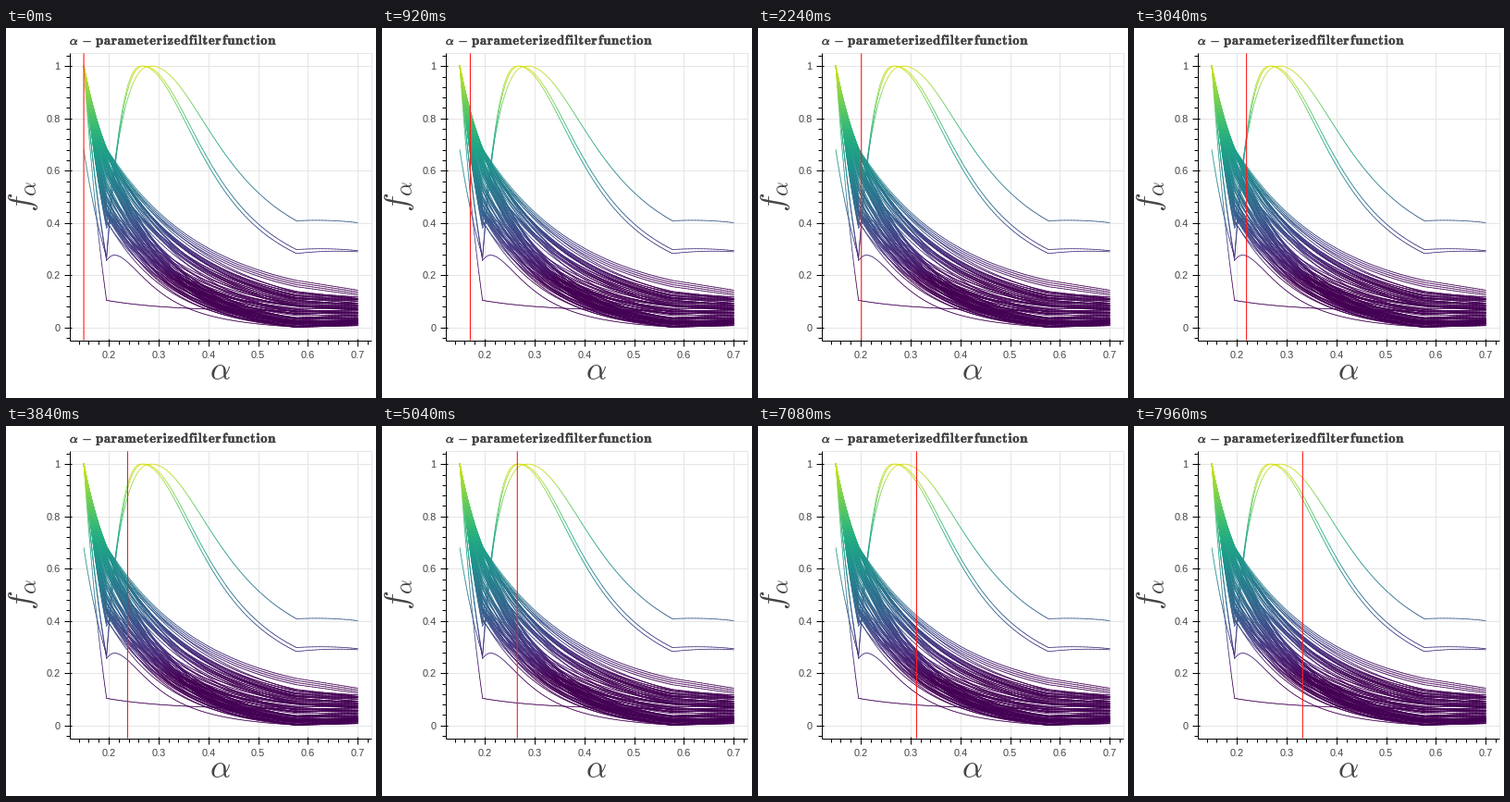
These frames come from a looping animation (400 px wide and 400 px high, 8 s). A matplotlib script:

```python
import numpy as np
import matplotlib.pyplot as plt
from matplotlib.animation import FuncAnimation
from matplotlib.collections import LineCollection
from matplotlib.patheffects import withStroke

SIZE, DPI = 400, 100
PX = 72 / DPI
FRAMES, INTERVAL = 200, 40
LEFT, RIGHT, TOP, BOTTOM = 69.4, 395.4, 27.4, 337.6
X_SCALE, Y_SCALE, Y_ZERO = 538.6, 282.6, 323.8
A_START, A_KINK, A_BEND, A_END = 0.15, 0.1957, 0.577, 0.7
A_STEP = 0.55 / 600
GREY, GRID = "#444444", "#e5e5e5"

plt.rcParams["mathtext.fontset"] = "cm"
fig = plt.figure(figsize=(SIZE / DPI, SIZE / DPI), dpi=DPI, facecolor="white")


def stage():
    """Full-figure axes in pixel units, y pointing down."""
    ax = fig.add_axes([0, 0, 1, 1])
    ax.set_xlim(0, SIZE)
    ax.set_ylim(SIZE, 0)
    ax.axis("off")
    return ax


def to_x(a):
    return 84.1 + (a - A_START) * X_SCALE


def to_y(v):
    return Y_ZERO - Y_SCALE * v


def decay(t, k):
    """Exponential fall from 1 at t=0 to 0 at t=1."""
    return (np.exp(-k * t) - np.exp(-k)) / (1 - np.exp(-k))


def bell_side(t, q):
    """Falling side of a bell, from 1 at t=0 to 0 at t=1."""
    return (1 / (1 + q * t * t) - 1 / (1 + q)) * (1 + q) / q


def span(a, b, n):
    return np.linspace(a, b, n), np.linspace(0, 1, n)


head_a, head_t = span(A_START, A_KINK, 26)
mid_a, mid_t = span(A_KINK, A_BEND, 160)
tail_a, tail_t = span(A_BEND, A_END, 20)
alphas = np.concatenate([head_a, mid_a[1:], tail_a[1:]])


def joined(mid, end, bow=0.0, start=1.0):
    """Add the steep head and the flat tail to a middle part."""
    head = mid[0] + (start - mid[0]) * decay(head_t, 0.7)
    tail = mid[-1] + (end - mid[-1]) * tail_t + bow * tail_t * (1 - tail_t)
    return np.concatenate([head, mid[1:], tail[1:]])


def falling(v1, v2, end, k, hump=0.0):
    mid = v2 + (v1 - v2) * decay(mid_t, k)
    return joined(mid + hump * mid_t * np.exp(-10 * mid_t), end)


def peaked(v1, peak, v2, q, end, start=1.0):
    rise = np.clip((mid_a - A_KINK) / (peak - A_KINK), 0, 1)
    fall = np.clip((mid_a - peak) / (A_BEND - peak), 0, 1)
    up = v1 + (1 - v1) * (1 - (1 - rise) ** 2.5)
    down = v2 + (1 - v2) * bell_side(fall, q)
    return joined(np.where(mid_a < peak, up, down), end, 0.02, start)


def curves():
    rng = np.random.default_rng(12)
    out = []
    for _ in range(88):
        r, s, e, w = rng.random(4)
        v1 = 0.685 - 0.29 * r ** 1.6
        v2 = 0.001 + 0.15 * s ** 1.4 * (1 - 0.5 * r)
        out.append(falling(v1, v2, 0.75 * v2 + 0.004 + 0.02 * e,
                           3 - 7 * v2 + 0.6 * (w - 0.5)))
    for i in range(4):
        v2 = 0.18 - 0.008 * i
        out.append(falling(0.685 - 0.008 * i, v2, 0.795 * v2, 1.95))
    out.append(falling(0.256, 0.002, 0.01, 3, 1.9))
    out.append(falling(0.39, 0.025, 0.02, 2.8, 2.5))
    out.append(falling(0.38, 0.018, 0.02, 2.8, 2.5))
    out.append(falling(0.104, 0.064, 0.056, 3))
    out.append(peaked(0.27, 0.267, 0.283, 4, 0.29, start=0.68))
    out.append(peaked(0.265, 0.271, 0.298, 3.8, 0.294))
    out.append(peaked(0.39, 0.286, 0.408, 2.8, 0.401))
    return out


def label(ax, x, y, s, px, **kw):
    return ax.text(x, y, s, fontsize=px * PX, color=GREY, **kw)


def line(ax, x, y, color="black", width=1, **kw):
    return ax.plot(x, y, color=color, lw=width * PX,
                   solid_capstyle="butt", **kw)[0]


def draw_axes(ax):
    xticks = np.arange(2, 8) / 10
    yticks = np.arange(0, 6) / 5
    for a in xticks:
        line(ax, [to_x(a)] * 2, [TOP, BOTTOM], GRID)
    for v in yticks:
        line(ax, [LEFT, RIGHT], [to_y(v)] * 2, GRID)
    line(ax, [LEFT, RIGHT, RIGHT], [TOP, TOP, BOTTOM], GRID)
    line(ax, [LEFT, LEFT], [TOP, BOTTOM])
    line(ax, [LEFT, RIGHT], [BOTTOM, BOTTOM])

    for i in range(7, 37):
        line(ax, [to_x(i / 50)] * 2, [BOTTOM, BOTTOM + 4])
    for i in range(-1, 27):
        line(ax, [LEFT - 4, LEFT], [to_y(i / 25)] * 2)
    font = dict(va="baseline", family="Liberation Sans")
    for a in xticks:
        line(ax, [to_x(a)] * 2, [BOTTOM - 2, BOTTOM + 6])
        label(ax, to_x(a), 356.6, f"{a:g}", 11, ha="center", **font)
    for v in yticks:
        line(ax, [LEFT - 6, LEFT + 2], [to_y(v)] * 2)
        label(ax, 58.7, to_y(v) + 4, f"{v:g}", 11, ha="right", **font)


def tracked(word):
    """Bold word with a little space between the letters."""
    return r"$\mathbf{" + r"}\hspace{0.055}\mathbf{".join(word) + "}$"


def draw_labels(ax):
    bold = dict(ha="center", va="baseline",
                path_effects=[withStroke(linewidth=0.5 * PX, foreground=GREY)])
    label(ax, 74, 18, r"$\alpha$", 13.3, **bold)
    label(ax, 88, 18, r"$-$", 13.3, **bold)
    for x, word in [(148, "parameterized"), (216, "filter"), (263.7, "function")]:
        label(ax, x, 18, tracked(word), 14.6, **bold)
    label(ax, 231.8, 380, r"$\alpha$", 35, ha="center", va="baseline")
    turn = dict(rotation=90, rotation_mode="anchor", ha="left", va="baseline")
    label(ax, 27.7, 199, "$f$", 35, **turn)
    label(ax, 33, 182.5, r"$\alpha$", 24.5, **turn)


def draw_curves(ax):
    segs, vals = [], []
    for v in curves():
        pts = np.column_stack([to_x(alphas), to_y(v)])
        segs.append(np.stack([pts[:-1], pts[1:]], axis=1))
        vals.append((v[:-1] + v[1:]) / 2)
    shade = np.clip(1.13 * (np.concatenate(vals) - 0.17), 0, 1)
    ax.add_collection(LineCollection(np.concatenate(segs),
                                     colors=plt.cm.viridis(shade),
                                     linewidths=0.78 * PX, capstyle="round",
                                     zorder=3), autolim=False)


# The still chart is rendered once and reused behind the moving line.
chart = stage()
draw_axes(chart)
draw_labels(chart)
draw_curves(chart)
fig.canvas.draw()
still = np.asarray(fig.canvas.buffer_rgba()).copy()
fig.clear()

ax = stage()
ax.imshow(still, extent=(0, SIZE, SIZE, 0), interpolation="nearest", aspect="auto")
cursor = line(ax, [0, 0], [TOP, BOTTOM], "#ff1a1a", 1.1, snap=False, zorder=5)


def update(n):
    x = to_x(A_START + A_STEP * n)
    cursor.set_xdata([x, x])
    return [cursor]


anim = FuncAnimation(fig, update, frames=FRAMES, interval=INTERVAL, repeat=True)
plt.show()
```
